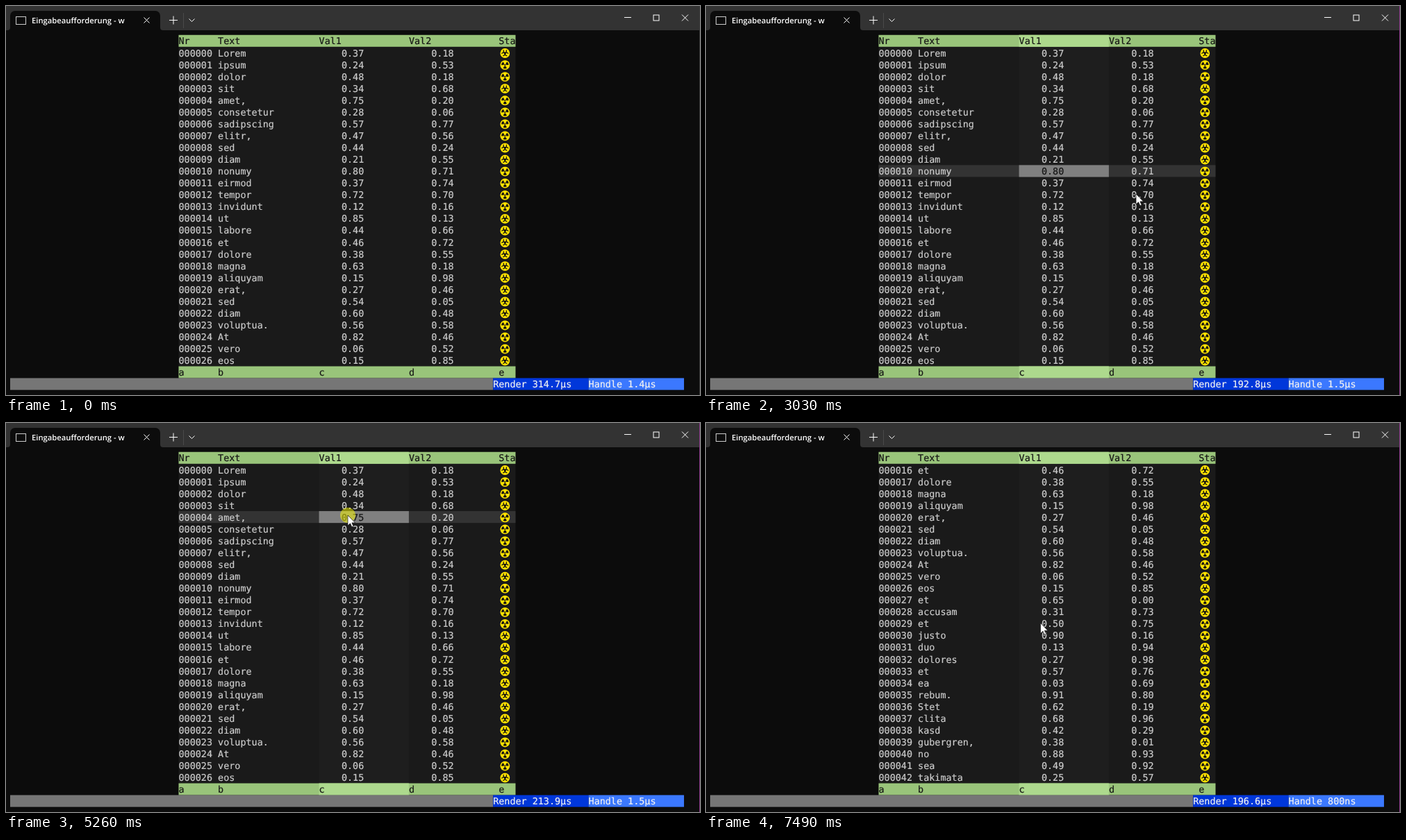
Recreate the animation shown at these times as an HTML page. Size 999 by 561 pixels, loop 8 s.

```html
<!DOCTYPE html>
<html lang="de">
<head>
<meta charset="utf-8">
<title>Table</title>
<style>
  html, body { margin: 0; width: 100%; height: 100%; overflow: hidden; background: #0c0c0c; }
  svg { display: block; }
  .mono { font: 13.43px "DejaVu Sans Mono", monospace; white-space: pre; text-rendering: geometricPrecision; }
  .mono text { color: #ccc; fill: currentColor; stroke: currentColor; stroke-width: .2; }
  .mono .dark { color: #161616; }
  .mono .light { color: #f2f2f2; }
  .tab { font: 600 11.25px "Open Sans", sans-serif; fill: #fff; text-rendering: geometricPrecision; }
  .line { fill: none; stroke: #fff; stroke-width: 1; }
</style>
</head>
<body>
<svg id="stage" width="999" height="561" viewBox="0 0 999 561">
  <defs>
    <clipPath id="body"><rect x="248" y="58.800" width="486" height="460.700"/></clipPath>
    <g id="rad">
      <circle r="6.9" fill="#ffe200"/>
      <circle r="3.5" fill="none" stroke="#111" stroke-width="3.6" pathLength="6" stroke-dasharray="1 1" transform="rotate(60)"/>
      <circle r="1.1" fill="#111"/>
    </g>
    <circle id="horn" cx="2.9" r="2.2" fill="none" stroke="#111" stroke-width="1.3" pathLength="8" stroke-dasharray="0 1 6 1"/>
    <g id="bio">
      <circle r="6.9" fill="#ffe200"/>
      <use href="#horn" transform="rotate(-90)"/>
      <use href="#horn" transform="rotate(30)"/>
      <use href="#horn" transform="rotate(150)"/>
      <circle r="1.2" fill="#111"/>
    </g>
  </defs>

  <rect width="999" height="561" fill="#0c0c0c"/>
  <rect width="999" height="35" fill="#333"/>
  <path d="M0 35h2a4 4 0 0 0 4-4V14a7 7 0 0 1 7-7H215a7 7 0 0 1 7 7V31a4 4 0 0 0 4 4z" fill="#0c0c0c"/>
  <rect x="14.5" y="15.5" width="14" height="11" fill="#0c0c0c" stroke="#ccc"/>
  <text class="tab" x="37" y="25">Eingabeaufforderung - w</text>
  <g class="line">
    <path d="M198.500 16.500l8 8m0-8l-8 8"/>
    <path d="M235 20.500h12m-6-6v12"/>
    <path d="M255.500 10v22" stroke="#4a4a4a"/>
    <path d="M263.500 18.500l4 4 4-4"/>
    <path d="M890 16.500h10"/>
    <rect x="932" y="13" width="8" height="8"/>
    <path d="M973 12.500l9 9m0-9l-9 9"/>
  </g>

  <g class="mono">
    <g id="back"></g>
    <g clip-path="url(#body)"><g id="rows">
      <rect id="rowMark" fill="#333"/>
      <rect id="cellMark" fill="#808080"/>
    </g></g>
    <g id="front"></g>
  </g>
  <rect id="edge" x="998" width="1" height="561"/>

  <g id="pointer">
    <circle id="press" r="11" fill="#ff0" opacity=".5"/>
    <path d="M0 0V15L3.500 11.800 5.900 17 8.100 16 5.900 10.900H10.600Z" fill="#fff" stroke="#111" stroke-width=".7"/>
  </g>
</svg>
<script>
const LOOP = 8000, LEFT = 248.5, TOP = 41.75, CELL = 8.083, ROW = 17.064;
const EDGES = [0, 7, 25, 41, 57, 60];

// word, both values in hundredths, status (b: biohazard, r: radioactive)
const DATA = `Lorem 37 18 b|ipsum 24 53 r|dolor 48 18 r|sit 34 68 b|amet, 75 20 r|consetetur 28 06 r
sadipscing 57 77 r|elitr, 47 56 r|sed 44 24 b|diam 21 55 b|nonumy 80 71 r|eirmod 37 74 r
tempor 72 70 r|invidunt 12 16 r|ut 85 13 b|labore 44 66 b|et 46 72 b|dolore 38 55 b
magna 63 18 b|aliquyam 15 98 b|erat, 27 46 b|sed 54 05 b|diam 60 48 b|voluptua. 56 58 r
At 82 46 r|vero 06 52 r|eos 15 85 b|et 65 00 r|accusam 31 73 b|et 50 75 r
justo 90 16 r|duo 13 94 b|dolores 27 98 b|et 57 76 r|ea 03 69 r|rebum. 91 80 r
Stet 62 19 b|clita 68 96 r|kasd 42 29 r|gubergren, 38 01 b|no 88 93 r|sea 49 92 r
takimata 25 57 b`.split(/[|\n]/).map(s => s.split(" "));

const smooth = f => f * f * (3 - 2 * f);
const easeOut = f => 1 - (1 - f) ** 1.8;

// start, end, steps, from, to, easing
const MOVES = [
  [660, 1080, 7, [835, 455], [381, 155], smooth],
  [1640, 2030, 6, [381, 155], [535, 233], smooth],
  [2620, 3030, 7, [535, 233], [619, 271], smooth],
  [3630, 4023, 6, [619, 271], [499.5, 244], smooth],
  [4510, 5260, 12, [499.5, 244], [492, 133], easeOut],
  [5740, 6220, 8, [492, 133], [481.5, 288.5], smooth]
];
const PRESSES = [[1480, 1640], [2290, 2340], [3170, 3300], [4101, 5540]];
// time, row, column
const PICKS = [[0, -1, -1], [1560, 5, 1], [2340, 10, 2], [3300, 12, 3], [4180, 10, 2]];
const SCROLLS = [[0, 0], [6820, 2], [7080, 4], [7162, 6], [7244, 10], [7326, 12], [7408, 14], [7490, 16]];
const STATS = [
  [0, "314.7µs", "1.4µs"], [1560, "172.6µs", "1.3µs"], [2340, "192.8µs", "1.5µs"],
  [3300, "187.4µs", "1.3µs"], [4180, "200.9µs", "1.2µs"], [4578, "194.2µs", "1.2µs"],
  [4783, "189.8µs", "1.1µs"], [4919, "198.3µs", "1.3µs"], [5055, "213.9µs", "1.5µs"],
  [6820, "205.1µs", "1.1µs"], [7162, "191.7µs", "900ns"], [7490, "196.6µs", "800ns"]
];

const $ = id => document.getElementById(id);
const at = (list, t) => list.findLast(e => t >= e[0]);
const colX = c => LEFT + c * CELL;
const rowY = r => TOP + r * ROW;

function add(parent, tag, attrs, text) {
  const el = document.createElementNS("http://www.w3.org/2000/svg", tag);
  set(el, attrs);
  if (text) el.textContent = text;
  return parent.appendChild(el);
}
function set(el, attrs) {
  for (const k in attrs) el.setAttribute(k, attrs[k]);
}
const box = (c0, c1, r, n = 1) => ({ x: colX(c0), y: rowY(r), width: (c1 - c0) * CELL, height: n * ROW });
const bar = (parent, c0, c1, r, fill, n) => add(parent, "rect", { ...box(c0, c1, r, n), fill });
const write = (parent, c, r, text, cls = "") =>
  add(parent, "text", { x: colX(c), y: rowY(r) + 13.7, class: cls }, text);

// table body
bar($("back"), 0, 60, 1, "#1a1a1a", 27);
const colMark = bar($("back"), 0, 0, 1, "#1e1e1e", 27);
const cells = DATA.map(([word, a, b, state], i) => {
  const g = $("rows"), r = i + 1;
  const list = [
    write(g, 0, r, String(i).padStart(6, "0")),
    write(g, 7, r, word),
    write(g, 29, r, "0." + a),
    write(g, 45, r, "0." + b)
  ];
  add(g, "use", { href: state === "b" ? "#bio" : "#rad", x: 718.3, y: rowY(r) + 9.2 });
  return list;
});

// header, footer and status line
const front = $("front");
const caps = [[0, ["Nr", "Text", "Val1", "Val2", "Sta"]], [28, ["a", "b", "c", "d", "e"]]].map(([r, names]) => {
  bar(front, 0, 60, r, "#99c47a");
  const mark = bar(front, 0, 0, r, "#add98d");
  names.forEach((name, i) => write(front, EDGES[i], r, name, "dark"));
  return mark;
});
bar(front, -30, 56, 29, "#767676");
bar(front, 56, 73, 29, "#0037da");
bar(front, 73, 90, 29, "#3b78ff");
const render = write(front, 56, 29, " ", "light");
const handle = write(front, 73, 29, " ", "light");

function pointer(t) {
  const m = at(MOVES, t);
  if (!m) return null;
  const [t0, t1, n, from, to, ease] = m;
  const k = Math.min(n - 1, Math.floor((t - t0) / (t1 - t0) * (n - 1) + 1e-6));
  const f = ease((k + 1) / n);
  return from.map((v, i) => v + (to[i] - v) * f);
}

let lit = null;
function select(row, col) {
  const c0 = EDGES[col] ?? 0, c1 = col < 0 ? 0 : EDGES[col + 1];
  set(colMark, box(c0, c1, 1, 27));
  caps.forEach((mark, i) => set(mark, box(c0, c1, i * 28)));
  set($("rowMark"), box(0, row < 0 ? 0 : 60, row + 1));
  set($("cellMark"), box(c0, c1, row + 1));
  if (lit) lit.classList.remove("dark");
  lit = row < 0 ? null : cells[row][col];
  if (lit) lit.classList.add("dark");
}

function draw(now) {
  const t = now % LOOP, pos = pointer(t);
  set($("pointer"), { visibility: pos ? "visible" : "hidden", transform: `translate(${pos || [0, 0]})` });
  set($("press"), { display: PRESSES.some(([a, b]) => t >= a && t < b) ? "inline" : "none" });

  let [, row, col] = at(PICKS, t);
  if (t >= 4510) row = t < 5540 ? Math.floor((pos[1] - rowY(1)) / ROW) : 4;
  select(row, col);

  set($("rows"), { transform: `translate(0 ${-at(SCROLLS, t)[1] * ROW})` });
  const [, r, h] = at(STATS, t);
  render.textContent = "Render " + r;
  handle.textContent = "Handle " + h;
  set($("edge"), { fill: t < 1480 ? "#3a3a3a" : "#8a3a8a" });
}

function tick() {
  draw(performance.now());
  requestAnimationFrame(tick);
}
tick();
</script>
</body>
</html>
```
